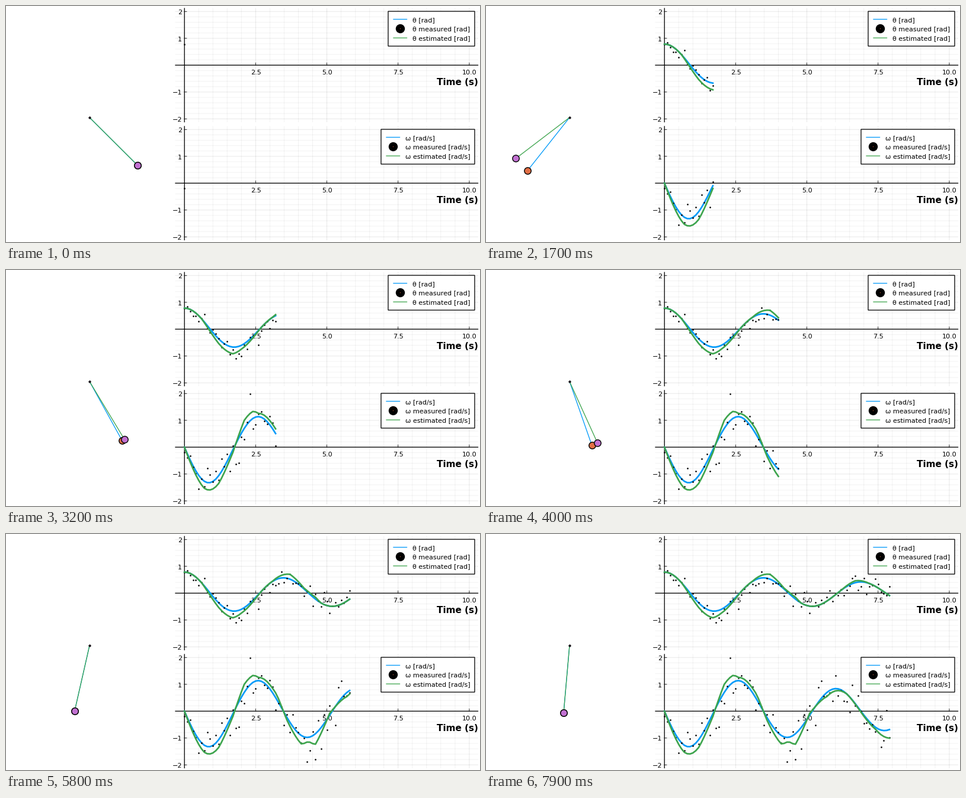
A matplotlib script for the animation above (8 s loop, 800x400 px).

```python
import numpy as np
import matplotlib.pyplot as plt
from matplotlib.animation import FuncAnimation
from matplotlib.patches import Rectangle

W, H, DPI = 800, 400, 100
FRAMES, DT = 80, 0.1
BLUE, ORANGE, GREEN, PURPLE = "#009af9", "#e26f46", "#3da44d", "#c271d2"
LEFT, RIGHT = 286, 796.5
PIVOT, ROD = (141, 189), 114


def px(size):
    """Pixels to points."""
    return size * 72 / DPI


def true_motion(n, stiffness=3.48, damping=0.178, sub=10):
    """Damped pendulum released at 45 degrees, integrated with RK4."""
    def rate(s):
        return np.array([s[1], -stiffness * np.sin(s[0]) - damping * s[1]])

    s, h, out = np.array([np.pi / 4, 0.0]), DT / sub, []
    for _ in range(n):
        out.append(s)
        for _ in range(sub):
            a = rate(s)
            b = rate(s + h / 2 * a)
            c = rate(s + h / 2 * b)
            d = rate(s + h * c)
            s = s + h / 6 * (a + 2 * b + 2 * c + d)
    return np.array(out).T


def measure(true, spread):
    """Noisy sensor readings, kept inside the panel."""
    return np.clip(true + rng.normal(0, spread, FRAMES), -2.1, 2.1)


def estimate(true, *error):
    """True value plus an error drifting between (time, error) points."""
    return true + np.interp(time, *zip(*error))


rng = np.random.default_rng(7)
time = np.arange(FRAMES) * DT
theta, omega = true_motion(FRAMES)
theta_meas, omega_meas = measure(theta, 0.22), measure(omega, 0.45)
theta_est = estimate(
    theta, (0.6, 0), (1.2, -0.17), (1.7, -0.25), (2, -0.14), (2.7, 0),
    (3.1, 0.01), (3.7, 0.18), (4.2, 0.03), (4.6, 0.07), (4.8, 0),
    (6.2, 0), (6.7, 0.07), (7.2, 0))
omega_est = estimate(
    omega, (0, 0), (0.7, -0.26), (1.2, -0.29), (1.7, -0.1), (2.1, 0.3),
    (2.4, 0.26), (2.6, 0.12), (3.25, 0.18), (3.6, -0.1), (4.1, -0.31),
    (4.35, -0.14), (4.6, -0.39), (5.1, 0.07), (5.7, -0.15), (6.4, 0),
    (7.4, -0.07), (7.9, -0.32))

plt.rcParams["font.family"] = "DejaVu Sans"
fig = plt.figure(figsize=(W / DPI, H / DPI), dpi=DPI, facecolor="white")
ax = fig.add_axes([0, 0, 1, 1])
ax.set_xlim(0, W)
ax.set_ylim(H, 0)
ax.axis("off")


def seg(xs, ys, color="black", width=1.3, **kw):
    return ax.plot(xs, ys, color=color, lw=px(width), snap=False, **kw)[0]


def dot(xs, ys, size, fill, **kw):
    return ax.plot(xs, ys, "o", ms=px(size), mfc=fill, snap=False,
                   **{"mew": 0, **kw})[0]


def label(x, y, s, size=8, **kw):
    return ax.text(x + 0.5, y, s, fontsize=size, va="baseline", **kw)


class Panel:
    def __init__(self, top, symbol, unit, box_left):
        self.zero = top + 100.3
        self.draw_axes(top)
        self.draw_legend(top, symbol, unit, box_left)
        self.true = seg([], [], BLUE, 2.7, zorder=4)
        self.dots = dot([], [], 2.7, "black", zorder=5)
        self.est = seg([], [], GREEN, 2.7, zorder=6)

    def x(self, t):
        return 301.2 + 48.07 * np.asarray(t)

    def y(self, v):
        return self.zero - 45.5 * np.asarray(v)

    def draw_axes(self, top):
        low, high = top + 4, top + 196.5
        for i in range(1, 21):
            x = self.x(i / 2)
            seg([x, x], [low, high], width=1, zorder=1,
                alpha=0.09 if i % 5 == 0 else 0.05)
        for i in range(-10, 11):
            y = self.y(i / 5)
            seg([LEFT, RIGHT], [y, y], width=1, zorder=1,
                alpha=0.09 if i % 5 == 0 else 0.05)
        seg([LEFT, RIGHT], [self.zero] * 2, zorder=2)
        seg([301.2, 301.2], [low, high], zorder=2)
        for t in (2.5, 5.0, 7.5, 10.0):
            x = self.x(t)
            seg([x, x], [self.zero, self.zero - 4], width=0.8, zorder=2)
            label(x, self.zero + 15.5, f"{t:.1f}", ha="center", zorder=3)
        for v in (-2, -1, 1, 2):
            y = self.y(v)
            seg([301, 305], [y, y], width=0.8, zorder=2)
            label(296.5, y + 4.7, f"{v}".replace("-", "\u2212"),
                  ha="right", zorder=3)
        label(796.5, top + 134.5, "Time (s)", 11, weight="bold", ha="right",
              zorder=3)

    def draw_legend(self, top, symbol, unit, left):
        ax.add_patch(Rectangle((left, top + 9), 791 - left, 59, fc="white",
                               ec="black", lw=px(1.3), snap=False, zorder=8))
        for row, (kind, color) in enumerate(
                [("", BLUE), (" measured", None), (" estimated", GREEN)]):
            y = top + 22.5 + 15.8 * row
            if color:
                seg([left + 9, left + 31.5], [y, y], color, 1.3, zorder=9)
            else:
                dot(left + 20.3, y, 15.4, "black", zorder=9)
                dot(left + 20.3, y, 1.2, ORANGE, zorder=9)
            label(left + 40, y + 4.2, f"{symbol}{kind} [{unit}]", zorder=9)

    def update(self, n, true, meas, est):
        xs = self.x(time[:n])
        for line, values in ((self.true, true), (self.dots, meas),
                             (self.est, est)):
            line.set_data(xs, self.y(values[:n]))


class Pendulum:
    def __init__(self, color, fill, z):
        edge = dict(mec="black", mew=px(1.4), zorder=z + 0.1)
        self.rod = seg([], [], color, 1.3, zorder=z)
        dot(*PIVOT, 2.4, fill, **edge)
        self.bob = dot([], [], 11.4, fill, **edge)

    def update(self, angle):
        x = PIVOT[0] + ROD * np.sin(angle)
        y = PIVOT[1] + ROD * np.cos(angle)
        self.rod.set_data([PIVOT[0], x], [PIVOT[1], y])
        self.bob.set_data([x], [y])


angle_panel = Panel(0, "θ", "rad", 645)
speed_panel = Panel(200, "ω", "rad/s", 633)
real = Pendulum(BLUE, ORANGE, 4)
guess = Pendulum(GREEN, PURPLE, 5)


def update(i):
    angle_panel.update(i + 1, theta, theta_meas, theta_est)
    speed_panel.update(i + 1, omega, omega_meas, omega_est)
    real.update(theta[i])
    guess.update(theta_est[i])
    return []


anim = FuncAnimation(fig, update, frames=FRAMES, interval=100, repeat=True,
                     repeat_delay=0, blit=False)
plt.show()
```
